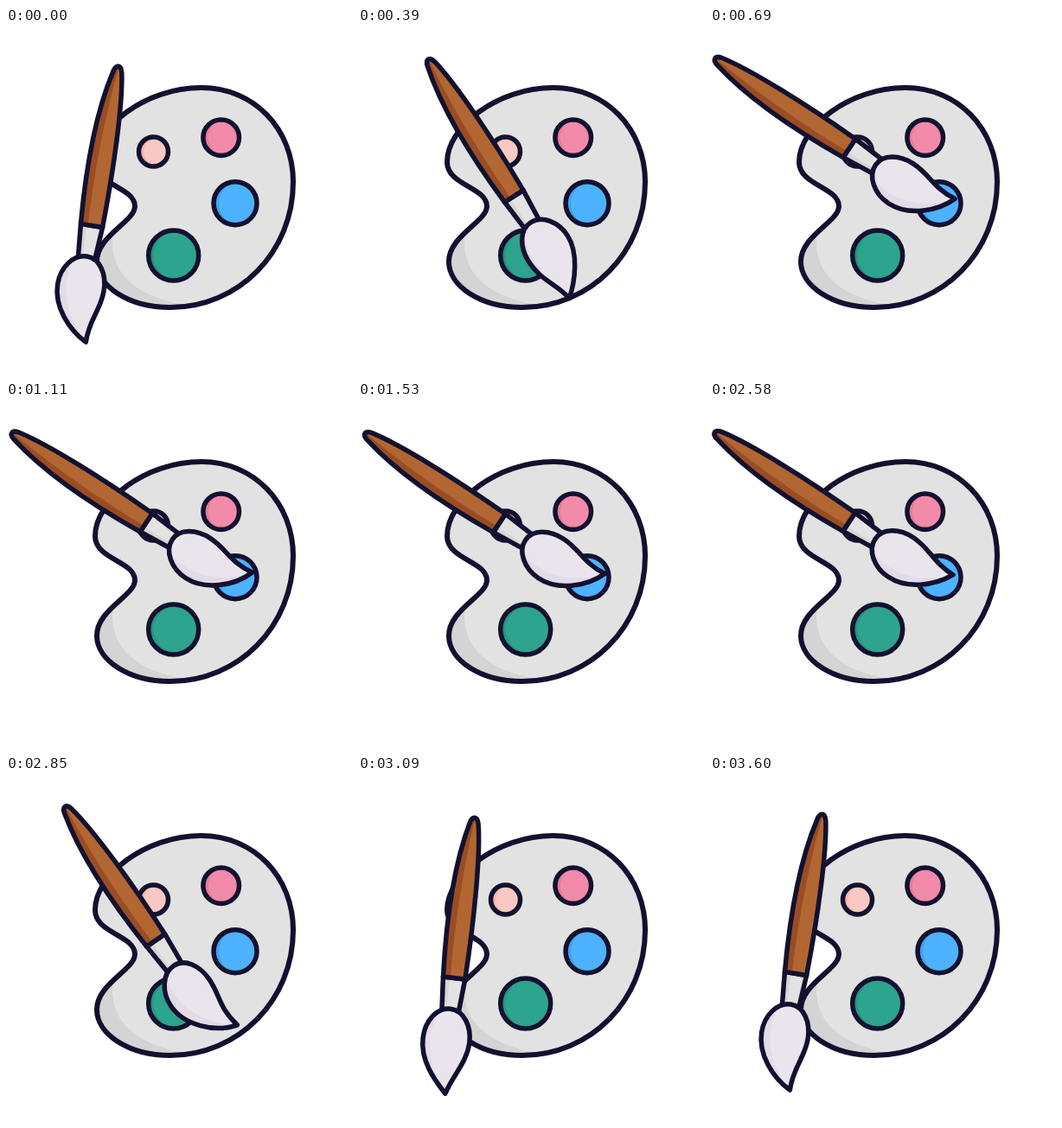
An HTML page with a canvas for the animation above (3660 ms loop, 400 by 400 pixels).

```html
<!DOCTYPE html>
<html lang="en">
<head>
<meta charset="utf-8">
<title>Palette and brush</title>
<style>
  html, body { margin: 0; width: 100%; height: 100%; overflow: hidden; background: #fff; }
  canvas { display: block; width: 400px; height: 400px; }
</style>
</head>
<body>
<canvas id="stage" width="400" height="400"></canvas>
<script>
const ctx = document.getElementById('stage').getContext('2d');
const LOOP = 3660, STEP = 30;
const INK = '#13112f';
const HANDLE = 187;

const palette = new Path2D(`M226 69C287 69 332 117 332 178C332 259 269 323 190 323
  C141 323 105 298 105 270C105 240 149 224 149 206C149 184 103 182 103 155C103 115 160 69 226 69Z`);
const paletteShade = new Path2D('M124 236C118 275 140 308 205 320L190 330L90 330L90 236Z');
const handle = new Path2D('M-13.5 0C-18.5 -70 -16 -135 -5 -180C-3 -189 3 -189 5 -180C12 -145 14 -70 12 0Z');
const handleShade = new Path2D('M-25 0L-5 0C-8 -60 -6 -130 1 -190L-25 -190Z');
const ferrule = new Path2D('M-13.5 0L12 0L9 42L-10 42Z');
const ferruleShade = new Path2D('M-16 0L-6 0L-5 42L-16 42Z');

// x, y, radius, colour, shade
const paints = [
  [170.5, 143, 17, '#f9c8c2', '#f3b9b2'],
  [248.7, 126.7, 20.8, '#f28aa9', '#e87c9d'],
  [265, 202.7, 25, '#4db2ff', '#3fa0ee'],
  [193.7, 263, 29, '#2da48d', '#27957f']
];

// time, handle tip x, handle tip y, angle in degrees, bristle bend
const poses = [
  [0, 130, 44, 9.3, 14.4],
  [120, 128.5, 44, 11.3, 17],
  [390, 81, 36, -32.3, -9.6],
  [520, 38, 32.5, -47.5, -3],
  [660, 7.5, 36, -56.5, 11.8],
  [2620, 7.5, 36, -56.5, 11.8],
  [2700, 17.5, 33, -52.5, 15],
  [2880, 78, 36, -30, 22],
  [3090, 135, 48, 7.1, 5.6],
  [3300, 130, 44.5, 10.9, 16],
  [3600, 130, 44, 9.3, 14.4],
  [LOOP, 130, 44, 9.3, 14.4]
];

const clamp01 = v => Math.max(0, Math.min(1, v));

function slope(i, k) {
  const a = poses[i], b = poses[i + 1];
  return a && b ? (b[k] - a[k]) / (b[0] - a[0]) : 0;
}

// Harmonic mean keeps the curve from overshooting its keys.
function tangent(i, k) {
  const a = slope(i - 1, k), b = slope(i, k);
  return a * b > 0 ? 2 * a * b / (a + b) : 0;
}

function poseValue(t, k) {
  let i = 0;
  while (i < poses.length - 2 && t >= poses[i + 1][0]) i++;
  const a = poses[i], b = poses[i + 1], d = b[0] - a[0];
  const u = (t - a[0]) / d, u2 = u * u, u3 = u2 * u;
  return a[k] * (2 * u3 - 3 * u2 + 1) + b[k] * (3 * u2 - 2 * u3)
    + d * (tangent(i, k) * (u3 - 2 * u2 + u) + tangent(i + 1, k) * (u3 - u2));
}

function brushPose(t) {
  const strokes = clamp01(Math.min((t - 560) / 100, (2700 - t) / 100));
  const phase = (t - 2580) / 462 * 2 * Math.PI;
  const c = strokes * Math.cos(phase), s = strokes * Math.sin(phase);
  return {
    x: poseValue(t, 1) - 2.3 * c,
    y: poseValue(t, 2) - 1.1 * c,
    angle: poseValue(t, 3) * Math.PI / 180,
    bend: poseValue(t, 4) + 3 * c - 6.4 * s
  };
}

function part(shape, fill, shade, shadeFill) {
  ctx.fillStyle = fill;
  ctx.fill(shape);
  ctx.save();
  ctx.clip(shape);
  ctx.fillStyle = shadeFill;
  ctx.fill(shade, 'evenodd');
  ctx.restore();
  ctx.stroke(shape);
}

function drawPaint([x, y, r, fill, shadeFill]) {
  const disc = new Path2D(), shade = new Path2D();
  disc.arc(x, y, r, 0, 2 * Math.PI);
  shade.rect(x - 2 * r, y - 2 * r, 4 * r, 4 * r);
  shade.moveTo(x + 6 + r, y);
  shade.arc(x + 6, y, r, 0, 2 * Math.PI);
  ctx.save();
  ctx.beginPath();
  ctx.rect(x - 2 * r, y - 2 * r, 4 * r, 4 * r);
  ctx.clip();
  part(disc, fill, shade, shadeFill);
  ctx.restore();
}

function bristles(bend) {
  const p = new Path2D(), shift = -0.08 * bend, tipY = 134;
  const left = shift - 27.5, right = shift + 26.5;
  p.moveTo(-0.5, 36);
  p.bezierCurveTo(15, 36, right, 53, right, 72);
  p.bezierCurveTo(right, 95, 10 + bend / 4, 115 - bend / 2, bend, tipY);
  p.bezierCurveTo(-11 + bend / 4, 116 + bend / 2, left, 99, left, 73);
  p.bezierCurveTo(left, 53, -16, 36, -0.5, 36);
  p.closePath();
  return p;
}

function bristleShade(bend) {
  const p = new Path2D();
  p.moveTo(-10, 36);
  p.bezierCurveTo(-24, 55, -24, 100, bend, 134);
  p.lineTo(-40, 134);
  p.lineTo(-40, 36);
  p.closePath();
  return p;
}

function drawBrush({ x, y, angle, bend }) {
  ctx.save();
  ctx.translate(x, y);
  ctx.rotate(angle);
  ctx.translate(0, HANDLE);
  part(ferrule, '#e3e3e3', ferruleShade, '#d6d6d6');
  part(handle, '#b26732', handleShade, '#994d25');
  part(bristles(bend), '#eae5ed', bristleShade(bend), '#e3dce7');
  ctx.restore();
}

function draw(now) {
  const t = Math.floor((now % LOOP) / STEP) * STEP;
  ctx.fillStyle = '#fff';
  ctx.fillRect(0, 0, 400, 400);
  ctx.strokeStyle = INK;
  ctx.lineJoin = 'round';
  ctx.lineWidth = 6;
  part(palette, '#e2e2e2', paletteShade, '#d4d4d4');
  ctx.lineWidth = 5.5;
  paints.forEach(drawPaint);
  drawBrush(brushPose(t));
}

const start = performance.now();
function tick() {
  draw(performance.now() - start);
  requestAnimationFrame(tick);
}
tick();
</script>
</body>
</html>
```
